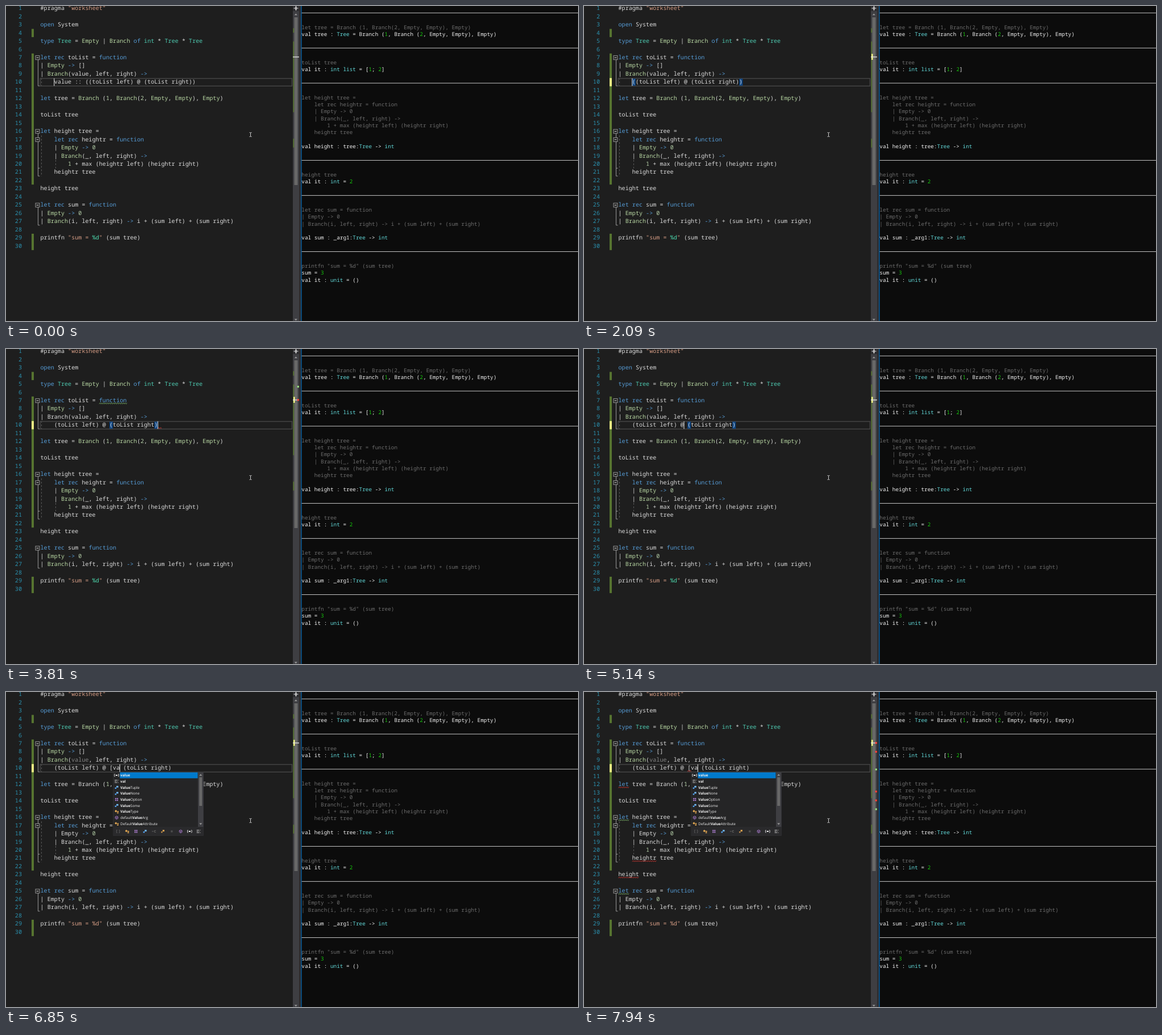
Animation of 1007 by 556 pixels, one loop 8 s. Source, as an HTML page:

```html
<!DOCTYPE html>
<html lang="en">
<head>
<meta charset="utf-8">
<title>F# worksheet</title>
<style>
  html, body { margin: 0; width: 100%; height: 100%; overflow: hidden; background: #1e1e1e; }
  svg { display: block; }
  text { white-space: pre; text-rendering: geometricPrecision; }
  .code { font: 10.133px "Noto Sans Mono", monospace; fill: #dcdcdc; }
  .out { font: 9.4px "Noto Sans Mono", monospace; fill: #f0f0f0; }
  .ui { font: 6.35px "Open Sans", sans-serif; fill: #f1f1f1; }
  .ui b, .bold { font-weight: 700; }
</style>
</head>
<body>
<svg width="1007" height="556" viewBox="0 0 1007 556">
  <g id="back"></g><g id="editor"></g><g id="front"></g><g id="popup"></g>
</svg>
<script>
const LOOP = 8000, LEFT = 60.5, CHAR = 6.08, PITCH = 14.46;
const RED = '#fc3e36', GREEN = '#95db7d', BLUE = '#569cd6', TEAL = '#4ec9b0', UNION = '#b8d7a3';
const byId = id => document.getElementById(id);
const colX = col => LEFT + col * CHAR;
const lineTop = n => 127.2 + (n - 10) * PITCH;
const baseline = n => 137.4 + (n - 10) * PITCH;
const rulerY = n => 12 + 7.8 * n;

const rect = (x, y, w, h, fill, more = '') =>
  `<rect x="${x}" y="${y}" width="${w}" height="${h}" fill="${fill}" ${more}/>`;
const path = (d, stroke, more = '') => `<path d="${d}" fill="none" stroke="${stroke}" ${more}/>`;
const shape = (d, fill) => `<path d="${d}" fill="${fill}"/>`;
const text = (x, y, cls, body, more = '') => `<text x="${x}" y="${y}" class="${cls}" ${more}>${body}</text>`;
const span = (color, body) => `<tspan fill="${color}">${body}</tspan>`;

const source = `#pragma "worksheet"

open System

type Tree = Empty | Branch of int * Tree * Tree

let rec toList = function
| Empty -> []
| Branch(value, left, right) ->


let tree = Branch (1, Branch(2, Empty, Empty), Empty)

toList tree

let height tree =
    let rec heightr = function
    | Empty -> 0
    | Branch(_, left, right) ->
        1 + max (heightr left) (heightr right)
    heightr tree

height tree

let rec sum = function
| Empty -> 0
| Branch(i, left, right) -> i + (sum left) + (sum right)

printfn "sum = %d" (sum tree)
`.split('\n');

const transcript = `let tree = Branch (1, Branch(2, Empty, Empty), Empty)
val tree : Tree = Branch (1, Branch (2, Empty, Empty), Empty)
-


toList tree
val it : int list = [1; 2]
-


let height tree =
    let rec heightr = function
    | Empty -> 0
    | Branch(_, left, right) ->
        1 + max (heightr left) (heightr right)
    heightr tree

val height : tree:Tree -> int
-


height tree
val it : int = 2
-


let rec sum = function
| Empty -> 0
| Branch(i, left, right) -> i + (sum left) + (sum right)

val sum : _arg1:Tree -> int
-


printfn "sum = %d" (sum tree)
sum = 3
val it : unit = ()`.split('\n');

const left = '(toList left) @ ', right = '(toList right)';
const tailErrors = [[10, 20, 1, RED], [12, 0, 3, RED], [16, 0, 3, GREEN], [21, 4, 7, RED],
  [23, 0, 6, RED], [25, 0, 3, GREEN]];

// Each step changes part of the editor state; the rest carries over.
const steps = [
  [0, { code: `value :: (${left}${right})`, caret: 4, caretOn: true, sel: 0, refs: false, braces: [],
        edited: false, unused: false, branchKnown: true, tailKnown: true, errors: [], pick: -1, tip: false }],
  [230, { refs: true }],
  [460, { caretOn: false }],
  [780, { refs: false, sel: 6, caret: 10, caretOn: true }],
  [1010, { sel: 8, caret: 12 }],
  [1160, { sel: 9, caret: 13 }],
  [1310, { braces: [13, 44] }],
  [1690, { caretOn: false }],
  [2090, { code: `(${left}${right})`, sel: 0, caret: 4, caretOn: true, braces: [4, 35], edited: true }],
  [2560, { caretOn: false }],
  [2710, { code: `${left}${right})`, caretOn: true, braces: [] }],
  [2880, { caret: 35 }],
  [2950, { unused: true }],
  [3270, { errors: [[10, 34, 1, RED], [7, 17, 8, GREEN]], branchKnown: false, unused: false }],
  [3350, { caret: 34 }],
  [3430, { braces: [20, 33] }],
  [3660, { code: left + right, braces: [] }],
  [3810, { braces: [20, 33] }],
  [4210, { caret: 28, braces: [] }],
  [4290, { errors: [], branchKnown: true }],
  [4360, { caret: 21 }],
  [4590, { caret: 20 }],
  [4760, { braces: [20, 33] }],
  [5140, { caret: 19 }],
  [5210, { braces: [] }],
  [5290, { code: `${left} ${right}`, caret: 20 }],
  [5370, { unused: true }],
  [5600, { code: `${left}[ ${right}`, caret: 21 }],
  [6000, { tailKnown: false }],
  [6080, { caretOn: false }],
  [6530, { code: `${left}[v ${right}`, caret: 22, caretOn: true }],
  [6700, { code: `${left}[va ${right}`, caret: 23 }],
  [6850, { pick: 0 }],
  [7250, { caretOn: false }],
  [7325, { pick: 1 }],
  [7400, { tip: true }],
  [7710, { pick: 0, tip: false, caretOn: true }],
  [7870, { errors: tailErrors }]
];

function highlight(line, known) {
  return line.replace(/"[^"]*"|->|\b(?:open|type|of|let|rec|function)\b|\b(?:Tree|int)\b|\b(?:Empty|Branch)\b|\b\d+\b/g, t => {
    if (t[0] === '"') return span('#d69d85', known ? t.replace('%d', span('#4edcb0', '%d')) : t);
    if (/^(Tree|int)$/.test(t)) return span(TEAL, t);
    if (/^(Empty|Branch)$/.test(t)) return known ? span(UNION, t) : t;
    return span(/\d/.test(t) ? '#b5cea8' : BLUE, t);
  });
}

function squiggle([line, col, len, color]) {
  const y = baseline(line) + 1.3;
  let d = `M${colX(col)} ${y + 1.6}`;
  for (let i = 1; i <= Math.round(len * CHAR / 1.7); i++) d += `l1.7 ${i % 2 ? -1.6 : 1.6}`;
  return path(d, color, 'stroke-width=".8"');
}

function drawBack() {
  let s = rect(0, 0, 1007, 556, '#1e1e1e');
  for (let n = 1; n <= 30; n++) s += text(28, baseline(n), 'code', span('#2b91af', n), 'text-anchor="end"');
  const changed = [[4, 4], [7, 22], [29, 30]];
  for (const [a, b] of changed) s += rect(45, lineTop(a), 4, (b - a + 1) * PITCH, '#577430');

  // Outlining brackets and indent guides
  const fold = (a, b) => {
    const y = baseline(a) - 2.8, end = lineTop(b + 1) - .6;
    return path(`M56.5 ${y}V${end}h3`, '#a5a5a5', 'stroke-width=".9"');
  };
  s += fold(7, 10) + fold(16, 21) + fold(25, 27) + path(`M56.5 ${lineTop(21)}h3`, '#a5a5a5', 'stroke-width=".9"');
  for (const n of [7, 16, 17, 25]) {
    const y = baseline(n) - 6.3;
    s += rect(52, y, 7, 7, '#1e1e1e', 'stroke="#a5a5a5" stroke-width=".9"')
       + path(`M53.7 ${y + 3.5}h3.6`, '#e0e0e0');
  }
  const guide = (x, a, b) => path(`M${x} ${lineTop(a)}V${lineTop(b + 1)}`, '#5c5c5c', 'stroke-dasharray="3 3"');
  s += guide(62.5, 10, 10) + guide(62.5, 17, 21) + guide(87.5, 20, 20);

  // Scroll bar
  s += rect(505, 0, 11, 556, '#3e3e42') + rect(507.5, 20, 6, 296, '#686868')
     + rect(505, 0, 11, 9, '#2d2d30')
     + path('M510.5 0v8M506.5 4h8', '#e8e8e8', 'stroke-width="1.2"')
     + path('M508.8 2.4h3.4M508.8 5.6h3.4', '#e8e8e8', 'stroke-width=".7"')
     + shape('M507.7 16.3h5.2l-2.6-3z', '#999') + shape('M507.7 552.3h5.2l-2.6 3z', '#999');
  for (const [a, b] of changed) s += rect(505.5, rulerY(a) - 4, 1.7, (b - a + 1) * 7.8, '#577430');

  // Output pane
  s += rect(516, 0, 4, 556, '#2d2d30') + rect(520, 0, 487, 556, '#0c0c0c') + rect(519, 0, 1.7, 556, '#0b568f');
  s += rect(520.5, 11.7, 487, 1, '#c4c4c4');
  transcript.forEach((line, i) => {
    const shift = transcript.slice(0, i).filter(l => l === '-').length * 0;
    const row = i + shift;
    if (line === '-') {
      s += rect(520.5, 73.7 + (row - 2) * 12.39 - 0, 487, 1, '#c4c4c4');
      return;
    }
    const result = /^val |^sum =/.test(line);
    const body = result
      ? line.replace(/\b(Tree(?! :)|int list|int|unit)\b|\b\d\b/g, t => span(/\d/.test(t) ? '#16c60c' : '#61d6d6', t))
      : span('#6c6c6c', line);
    s += text(520.3, 40.6 + outputRow(i) * 12.39, 'out', body);
  });
  byId('back').innerHTML = s;
}

// A separator sits one blank row below the block above it.
function outputRow(i) { return i + transcript.slice(0, i).filter(l => l === '-').length * 0; }

function drawEditor(s) {
  let out = '';
  const top = lineTop(10);
  if (s.sel) out += rect(colX(4), top, s.sel * CHAR, PITCH, '#264f78');
  else out += rect(60, 127.9, 443.5, 13.4, 'none', 'stroke="#464646" stroke-width="1.4"');
  if (s.edited) out += rect(45, top, 4, PITCH, '#eff284');
  if (s.refs) for (const [n, c] of [[9, 9], [10, 4]])
    out += rect(colX(c), lineTop(n) + .6, 5 * CHAR, PITCH - 1.2, '#0e4583');
  for (const c of s.braces) out += rect(colX(c), top + 1, CHAR, PITCH - 2, '#0e4583');

  source.forEach((line, i) => {
    const n = i + 1;
    let body = highlight(n === 10 ? '    ' + s.code : line, n === 9 ? s.branchKnown : n < 9 || s.tailKnown);
    if (n === 9 && s.unused) body = body.replace('value', span('#858585', 'value'));
    if (line || n === 10) out += text(LEFT, baseline(n), 'code', body);
  });
  out += s.errors.map(squiggle).join('');
  if (s.caretOn) out += rect(colX(s.caret) - .5, top + .4, 1, PITCH - 1, '#e8e8e8');

  if (s.edited) out += rect(506, 84.5, 2.6, 10.5, '#eff284');
  out += rect(505, 89.3, 11, 1.3, '#e8e8e8');
  for (const [line, , , color] of s.errors) out += rect(512.7, rulerY(line) - 1.7, 3.2, 3.2, color);
  byId('editor').innerHTML = out;
}

const icons = {
  variable: path('M-2.6-2h-1.2v4h1.2M2.6-2h1.2v4h-1.2', '#f1f1f1', 'stroke-width=".8"') +
    rect(-1.8, -1.1, 3.6, 2.2, '#f1f1f1', 'rx="1"'),
  lines: [-2.6, -.4, 1.8].map((y, i) => rect(-3.4, y, i === 1 ? 3 : 4.5, .9, '#d0d0d0') + rect(i === 1 ? .4 : 2, y, 1.6, .9, '#9a9a9a')).join(''),
  value: rect(-.4, -2.6, 3.4, 2.8, '#75beff') + rect(-3, .2, 2.6, 2.3, '#55aaff'),
  union: [-2.6, .4].map(x => rect(x, -2.5, 2.2, 2, '#b180d7') + rect(x, .5, 2.2, 2, '#b180d7')).join(''),
  type: shape('M-3.4-.8l2.2-2.2 2.2 2.2-2.2 2.2z', '#e8ab53') + rect(1, -.9, 2.6, 1.7, '#e8ab53') + rect(.8, 1.5, 2.6, 1.7, '#e8ab53'),
  cube: path('M0-2.7l2.4 1.3v2.8L0 2.7l-2.4-1.3v-2.8zM-2.4-1.4L0-.1l2.4-1.3M0-.1v2.8', '#b180d7', 'stroke-width=".8"'),
  braces: path('M-1.5-2.5h-1v2l-.7.5.7.5v2h1M1.5-2.5h1v2l.7.5-.7.5v2h-1', '#707070', 'stroke-width=".7"'),
  face: path('M-3.4 0h3M3.5-1.5h-2.4v3h2.4', '#686868', 'stroke-width=".9"'),
  event: rect(-.4, -2.6, 3.2, 2.8, '#e8ab53') + rect(-3, .2, 2.5, 2.2, '#c8924a'),
  dot: rect(-1.7, -1.7, 3.4, 3.4, '#4c4c4c')
};
const icon = (name, x, y) => `<g transform="translate(${x} ${y})">${icons[name]}</g>`;

// An asterisk pair marks the matched part of each name.
const choices = [['variable', '*value*'], ['lines', '*val*'], ['value', '*Value*Tuple'], ['value', '*Value*None'],
  ['union', '*Value*Option'], ['value', '*Value*Some'], ['type', '*Value*Type'], ['cube', 'default*Value*Arg'],
  ['type', 'Default*Value*Attribute']];
const filters = ['braces', 'type', 'union', 'value', 'face', 'event', 'dot', 'cube', 'variable', 'lines'];

function drawPopup(s) {
  if (s.pick < 0) { byId('popup').innerHTML = ''; return; }
  let out = rect(189, 141.7, 158.5, 111.5, '#252526', 'stroke="#3a3a3e" stroke-width=".7"');
  out += rect(200.5, 141.9 + s.pick * 10.68, 137, 10.4, '#007acc');
  choices.forEach(([kind, name], i) => {
    const y = 147 + i * 10.68;
    out += icon(kind, 194.7, y)
      + text(201.3, y + 2.2, 'ui', name.replace(/\*(.*)\*/, '<tspan class="bold">$1</tspan>'));
  });
  out += rect(338, 142, 9.3, 96, '#3e3e42') + rect(340.2, 150.5, 5, 50.5, '#686868')
    + shape('M340.2 147.7h5l-2.5-3z', '#999') + shape('M340.2 231.6h5l-2.5 3z', '#999');
  out += rect(189.4, 238, 158, 14.8, '#2a2a2c');
  filters.forEach((kind, i) => out += icon(kind, 197.3 + i * 15.75, 246));
  if (s.tip) out += rect(348.4, 152.4, 279.2, 12.2, '#424245', 'stroke="#555558" stroke-width=".8"')
    + text(350.3, 160.8, 'ui', 'Used in a signature to indicate a value, or in a type to declare a member, in limited situations.');
  byId('popup').innerHTML = out;
}

const states = [];
for (const [, change] of steps) states.push({ ...states[states.length - 1], ...change });

drawBack();
byId('front').innerHTML = path('M428.5 223.4h1.4l.6.6.6-.6h1.4M430.5 224v6M428.5 230.6h1.4l.6-.6.6.6h1.4', '#e0e0e0', 'stroke-width=".9"');

const start = performance.now();
let shown = -1;
function tick() {
  const t = (performance.now() - start) % LOOP;
  const now = steps.findLastIndex(([time]) => time <= t);
  if (now !== shown) {
    shown = now;
    drawEditor(states[now]);
    drawPopup(states[now]);
  }
  requestAnimationFrame(tick);
}
tick();
</script>
</body>
</html>
```
